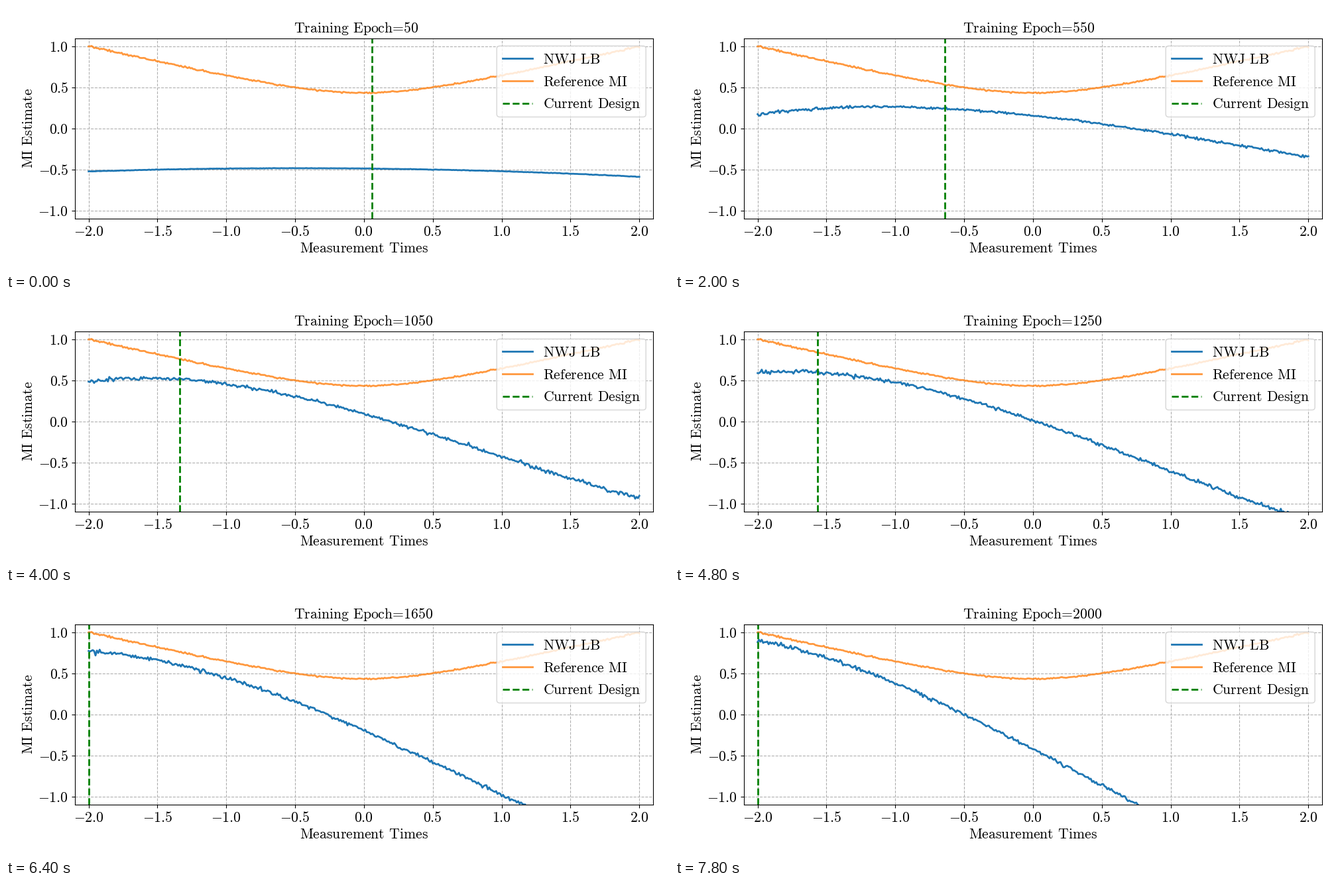
Recreate the animation shown at these times as a matplotlib script. Size 1000 by 400 pixels, loop 8 s.

```python
import numpy as np
import matplotlib.pyplot as plt
from matplotlib.animation import FuncAnimation
from matplotlib.patches import FancyBboxPatch

W, H, DPI = 1000, 400, 100
FRAMES, STEP_MS = 40, 200
SIZE = 15.65
BLUE, ORANGE, GREEN = "#1f77b4", "#ff7f0e", "green"

plt.rcParams["mathtext.fontset"] = "cm"

x = np.linspace(-2, 2, 401)


def roman(text):
    """Upright Computer Modern with normal text spacing."""
    text = text.replace("=", r"\hspace{-0.2}=\hspace{-0.2}")
    text = text.replace(" ", r"\hspace{0.38}")
    return r"$\mathrm{" + text + "}$"


def jitter(seed):
    return np.random.default_rng(seed).normal(size=x.size)


def saturate(t, scale, power):
    return 1 - np.exp(-(t / scale) ** power)


def reference():
    mean = 0.437 + 0.26 * (np.sqrt(1 + 2.3 * x ** 2) - 1)
    return mean + jitter(4) * (0.0035 + 0.0012 * np.abs(x))


def bound(i):
    """Cubic whose coefficients evolve with training progress t."""
    t = i / (FRAMES - 1)
    level = 0.34 - 0.76 * t ** 1.8 - 0.827 * np.exp(-t / 0.13)
    slope = -0.0165 - (1.02 * t - 0.16 * t ** 2) * saturate(t, 0.25, 1.5)
    bend = -0.017 - 0.22 * t + 0.193 * t ** 2
    twist = 0.031 * saturate(t, 0.34, 2.5)
    sd = 0.0015 + 0.0125 * saturate(i, 12, 1)
    noise = jitter([7, i]) * sd * (0.7 + 0.2 * np.abs(x))
    return np.polyval([twist, bend, slope, level], x) + noise


def design(i):
    """Drifts left until it is clamped at the edge of the allowed range."""
    return np.interp(i, [0, 6, 14, 20, 24, 32],
                     [0.056, -0.332, -0.953, -1.338, -1.565, -2])


fig = plt.figure(figsize=(W / DPI, H / DPI), dpi=DPI, facecolor="white")

left, right, top, bottom = 103.86, 975.98, 49.08, 321.12
ax = fig.add_axes([left / W, 1 - bottom / H, (right - left) / W, (bottom - top) / H])
ax.set_xlim(-2.1, 2.1)
ax.set_ylim(-1.1, 1.1)
xt, yt = np.arange(-2, 2.1, 0.5), np.arange(-1, 1.1, 0.5)
ax.set_xticks(xt, [roman(f"{v:.1f}") for v in xt], fontsize=SIZE)
ax.set_yticks(yt, [roman(f"{v:.1f}") for v in yt], fontsize=SIZE)
ax.grid(True, linestyle="--", color="#b0b0b0", linewidth=0.8)
ax.set_axisbelow(True)

curve, = ax.plot(x, bound(0), color=BLUE, lw=2)
ax.plot(x, reference(), color=ORANGE, lw=2, alpha=0.8)
marker = ax.axvline(design(0), color=GREEN, lw=2, ls="--")

# Labels and legend, placed in pixels
page = fig.add_axes([0, 0, 1, 1], zorder=5)
page.set_xlim(0, W)
page.set_ylim(H, 0)
page.axis("off")


def label(px, py, text, **kw):
    return page.text(px, py, roman(text), fontsize=SIZE, va="baseline", **kw)


title = label(434.4, 40.4, "Training Epoch=50")
label(539.9, 372.4, "Measurement Times", ha="center")
label(39.6, 184.3, "MI Estimate", ha="center", rotation=90, rotation_mode="anchor")

page.add_patch(FancyBboxPatch(
    (740.2, 60.3), 225, 107.2, boxstyle="round,pad=0,rounding_size=4.4",
    facecolor="white", edgecolor="0.8", linewidth=1, alpha=0.8))
rows = [("NWJ LB", BLUE, "-", 1), ("Reference MI", ORANGE, "-", 0.8),
        ("Current Design", GREEN, "--", 1)]
for n, (name, color, style, alpha) in enumerate(rows):
    y = 79.3 + 33.65 * n
    page.plot([749.1, 793.5], [y, y], color=color, ls=style, lw=2, alpha=alpha)
    label(810, y + 7.8, name)


def update(i):
    curve.set_ydata(bound(i))
    marker.set_xdata([design(i)] * 2)
    title.set_text(roman(f"Training Epoch={50 * (i + 1)}"))
    return curve, marker, title


anim = FuncAnimation(fig, update, frames=FRAMES, interval=STEP_MS, repeat=True)
plt.show()
```
